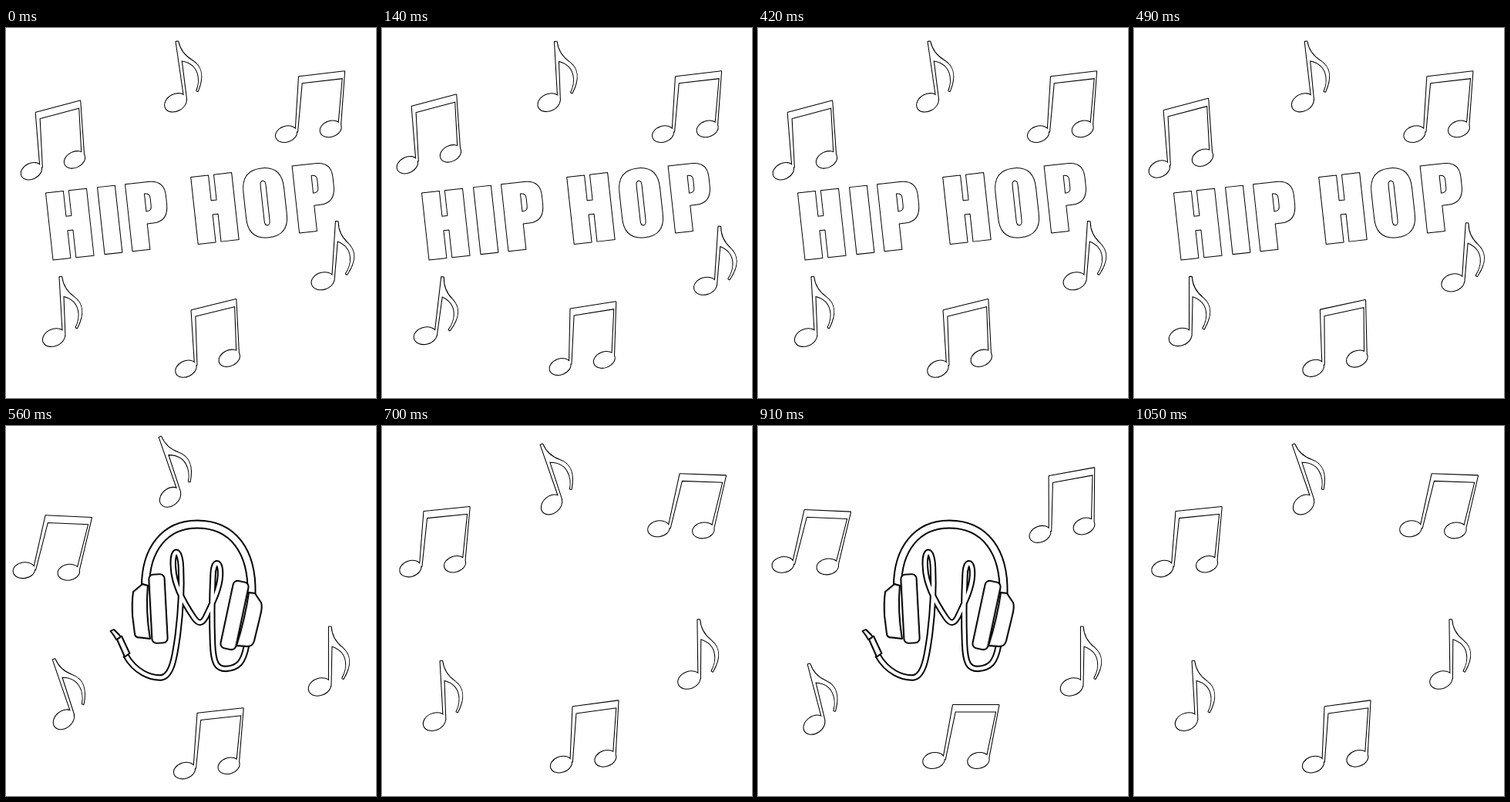
These frames come from a looping animation (480 px wide and 480 px high, 1120 ms). An HTML page with a canvas:

```html
<!DOCTYPE html>
<html lang="en">
<head>
<meta charset="utf-8">
<title>Hip hop</title>
<style>
html, body { margin: 0; width: 100%; height: 100%; overflow: hidden; background: #fff; }
canvas { display: block; width: 480px; height: 480px; }
</style>
</head>
<body>
<canvas id="stage" width="480" height="480" role="img" aria-label="HIP HOP"></canvas>
<script>
const ctx = document.getElementById('stage').getContext('2d');
const STEP = 70, COUNT = 16, SWITCH = 8, HOP = 5;

function ellipse(x, y, rx, ry, tilt) {
  const p = new Path2D();
  p.ellipse(x, y, rx, ry, tilt, 0, Math.PI * 2);
  return p;
}

// Notes are drawn from the top of the left stem and turn about mid.
const single = { mid: [-6.75, 39.25], path: new Path2D(
  'M-1.5 .5L1.2 .5C2 14 9 22 15.5 27.3C26 36 29 48 17.3 68L15.8 67.2' +
  'C22.5 56 26 33 2 25.5L1 77L-1.5 74Z') };
single.path.addPath(ellipse(-13.5, 78.5, 14.6, 10.6, -0.36));

const beamed = { mid: [-12.25, 36.25], path: new Path2D(
  'M.5 .5L60 .5L46.5 71L44 70L56.7 9L3.3 9L-9.7 71L-12 70Z') };
for (const x of [-24.5, 33.5]) beamed.path.addPath(ellipse(x, 72.5, 13.8, 9.8, -0.2));

// All poses are [x, y, degrees]. With the word a note swings from home by swing;
// with the headphones it hops from rest by hop, and lands moved by shift.
const STILL = [0, 0, 0];
const notes = [
  { shape: single, home: [221, 57, -8.3], swing: [0, 0, 5],
    rest: [206.5, 53, -19.2], hop: [7, 9.7, 0], gone: 13 },
  { shape: single, home: [420.2, 289.5, 3.7], swing: [8.5, 6.5, 0],
    rest: [413.7, 299.2, 0], hop: [-9, -9, -0.7] },
  { shape: single, home: [66.5, 362, -3.3], swing: [1, -1, 10],
    rest: [68.5, 341.5, -19], hop: [4, 2.5, 15.8], shift: [1, 6.5, 4.3] },
  { shape: beamed, home: [35.5, 147.5, -14.8], swing: [0, -8, 0],
    rest: [37.2, 151.5, 2.5], hop: [8.2, -3.7, -8.3], shift: [9, -7.3, 0] },
  { shape: beamed, home: [371.5, 100.2, -6.7], swing: [1, 0, 0],
    rest: [371.5, 102.5, -10.3], hop: [1, -5, 12.4], gone: 8 },
  { shape: beamed, home: [236.7, 404, -13.8], swing: [0.8, -2.2, 4.8],
    rest: [239.7, 409.7, -6.2], hop: [0, -8.2, -1.5], shift: [0.5, -12, 6.2] }
];

const add = (a, b, k = 1) => a.map((v, i) => v + b[i] * k);

// 0 on landing, 1 two steps later, then back down over three.
function height(n) {
  const k = (n - SWITCH) % HOP;
  return k <= 2 ? k / 2 : (HOP - k) / 3;
}

function poseAt(note, n) {
  if (n < SWITCH) return add(note.home, note.swing, (1 - Math.cos(n * Math.PI / 3)) / 1.5);
  const up = height(n);
  const landed = n > SWITCH + 2 ? 1 - up : 0;
  return add(add(note.rest, note.hop, up), note.shift || STILL, landed);
}

function outline(path, width, color = '#000') {
  ctx.lineWidth = width;
  ctx.strokeStyle = color;
  ctx.stroke(path);
}

function fill(path) {
  ctx.fillStyle = '#fff';
  ctx.fill(path);
}

function drawNote(note, n) {
  if (note.gone === n) return;
  const [x, y, turn] = poseAt(note, n);
  const [mx, my] = note.shape.mid;
  ctx.save();
  ctx.translate(x, y);
  ctx.rotate(turn * Math.PI / 180);
  ctx.translate(-mx, -my);
  outline(note.shape.path, 2.1);
  fill(note.shape.path);
  ctx.restore();
}

// Block lettering
const H = new Path2D('M0 0H23V33H30V0H53.3V87.5H30V51.5H23V87.5H0Z');
const I = new Path2D('M0 0H23V87.5H0Z');
const P = new Path2D('M0 0H30C44 0 51 7 51 20V31C51 47 44 54 31 54H23V87.5H0Z' +
  'M23.5 15V38C29 38 30.5 36 30.5 31V22C30.5 17 29 15 23.5 15Z');
const O = new Path2D('M0 27C0 8 9 -1.5 26.5 -1.5S53 8 53 27V61C53 80 44 89 26.5 89S0 80 0 61Z' +
  'M23 21V67C23 75 30 75 30 67V21C30 13 23 13 23 21Z');
const word = [[H, 0], [I, 67.4], [P, 103.6], [H, 189.3], [O, 255], [P, 321.5]];

function drawWord() {
  ctx.save();
  ctx.translate(51.5, 214);
  ctx.rotate(-0.109);
  for (const [glyph, x] of word) {
    ctx.save();
    ctx.translate(x, 0);
    outline(glyph, 1);
    ctx.restore();
  }
  ctx.restore();
}

// Headphones
const band = new Path2D('M181 208C181 160 206 127.5 248 127.5C294 127.5 320 162 318.5 218');
const cable = new Path2D('M155 297C168 320 188 327 201 326.5C215 325 219 300 223 270' +
  'C227 237 228 205 227 184C226 156 215 158 217 184C218 207 231 230 244 249' +
  'C250 257 254 257 259 248C268 229 277 212 278 194C279 173 269 173 268.500 194' +
  'C267 225 267 256 268 282C269 309 274 315 285 315C302 314 308 306 312 285');
const cupLeft = new Path2D('M177 205L165 215Q163 228 164 246L167 270Q168 275 174 274.500L187 276Q181 240 184 207Z');
const cupRight = new Path2D('M323 217L331 229Q333 234 330 246L322 279Q320 286 313 286L299 285Q310 250 315 216Z');
const plug = new Path2D('M144 277L150 272.500L160.500 295L154 299.500Z');
const tip = new Path2D('M135.500 266L140 264L147 271L149 274L143 277L140 272Z');

function pad(x, y, turn) {
  const box = new Path2D(), p = new Path2D();
  box.roundRect(-10.2, -44.7, 20.4, 89.4, 6);
  p.addPath(box, new DOMMatrix().translate(x, y).rotate(turn));
  return p;
}
const solids = [cupLeft, cupRight, pad(197.5, 237, -3), pad(296.5, 245.5, 12), tip, plug];

function tube(path, w) {
  outline(path, w);
  outline(path, w - 3.8, '#ddd');
  outline(path, w - 5, '#fff');
}

function solid(path) {
  fill(path);
  ctx.save();
  ctx.clip(path);
  outline(path, 4.5, '#ddd');
  ctx.restore();
  outline(path, 1.9);
}

function drawHeadphones() {
  tube(cable, 8.4);
  tube(band, 12);
  solids.forEach(solid);
}

function draw(n) {
  ctx.fillStyle = '#fff';
  ctx.fillRect(0, 0, 480, 480);
  ctx.lineJoin = 'round';
  for (const note of notes) drawNote(note, n);
  if (n < SWITCH) drawWord();
  else if (height(n) < 0.6) drawHeadphones();
}

const start = performance.now();
function tick() {
  const t = Math.max(0, performance.now() - start);
  draw(Math.floor(t / STEP) % COUNT);
  requestAnimationFrame(tick);
}
draw(0);
requestAnimationFrame(tick);
</script>
</body>
</html>
```
